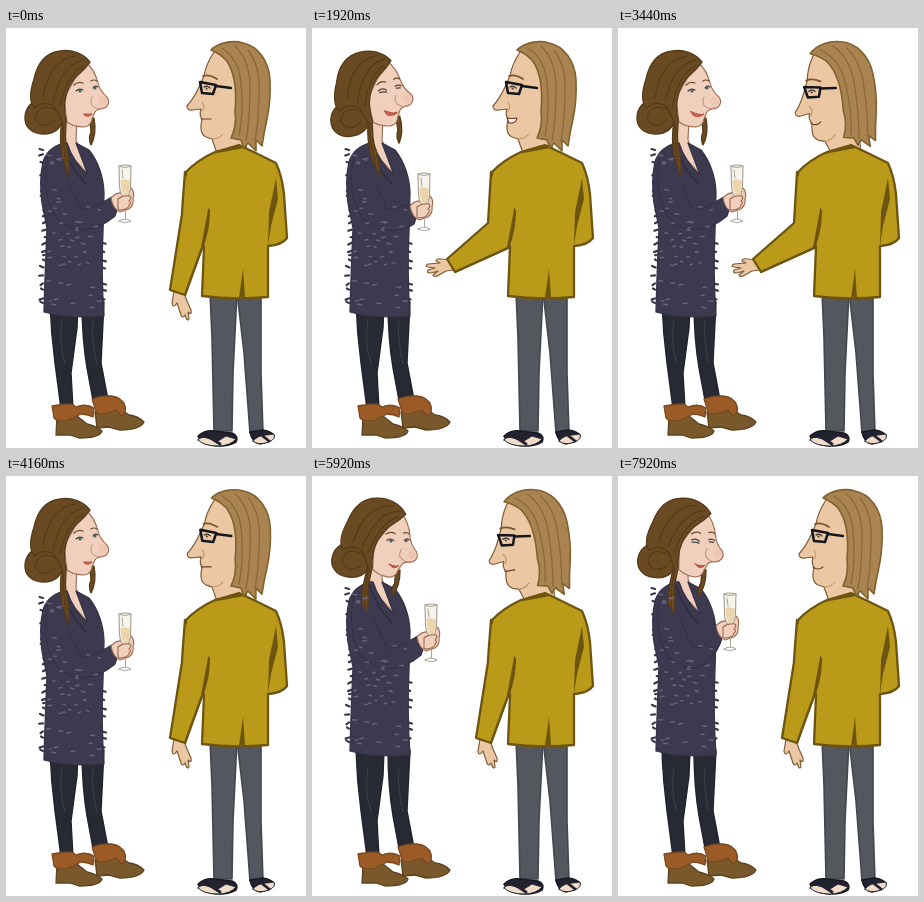
These frames come from a looping animation (300 by 420 pixels, 8000 ms). An HTML page:

```html
<!DOCTYPE html>
<html lang="en">
<head>
<meta charset="utf-8">
<title>Conversation</title>
<style>
html, body { margin: 0; width: 100%; height: 100%; overflow: hidden; background: #fff; }
svg { display: block; width: 100%; height: 100%; }
path { stroke-linejoin: round; stroke-linecap: round; }
.ln { fill: none; }
.legging { fill: #282a33; stroke: #20222c; stroke-width: 1.4; }
.boot { fill: #79592c; stroke: #5d421f; stroke-width: 1.3; }
.cuff { fill: #9a5b27; stroke: #79481e; stroke-width: 1.3; }
.coat { fill: #3d3a50; stroke: #343247; stroke-width: 1.3; }
.fold { fill: none; stroke: #2d2b3e; stroke-width: 1.2; }
.tuft { fill: none; stroke: #66647c; stroke-width: 1.5; }
.fringe { fill: none; stroke: #39374c; stroke-width: 2.2; }
.wskin { fill: #f0d0bd; stroke: #9c6a50; stroke-width: 1.1; }
.whair { fill: #694a22; stroke: #543a18; stroke-width: 1.3; }
.wlock { fill: none; stroke: #523817; stroke-width: 1; }
.trouser { fill: #54575e; stroke: #44474e; stroke-width: 1.6; }
.jacket { fill: #ba9a18; stroke: #6d5510; stroke-width: 2.3; }
.seam { fill: none; stroke: #6d5510; stroke-width: 2; }
.mskin { fill: #ebc8a3; stroke: #7d5c38; stroke-width: 1.2; }
.mhair { fill: #a98450; stroke: #80612f; stroke-width: 1.6; }
.mlock { fill: none; stroke: #8a6939; stroke-width: 1.3; }
.shoe { fill: #22232f; stroke: #181923; stroke-width: 1.5; }
.toe { fill: #f1dccb; stroke: #22232f; stroke-width: 1; }
</style>
</head>
<body>
<svg viewBox="0 0 300 420">
  <!-- woman -->
  <path class="legging" d="M44 274Q45 305 49 335L55 381H67L65 345 71 300 72 274Z"/>
  <path class="legging" d="M76 274Q76 310 81 340L87 372H102L95 335 98 274Z"/>
  <path class="ln" stroke="#3c3e49" d="M56 292Q52 312 59 336M87 292Q85 312 91 336"/>
  <path class="boot" d="M89 384L91 400 103 399 114 402Q134 402 138 394Q132 388 123 387L113 380Z"/>
  <path class="cuff" d="M86 371Q96 367 105 368Q116 369 119 378Q121 385 115 388L110 382Q100 386 91 386Z"/>
  <path class="boot" d="M51 388L50 407 64 407 73 410Q94 410 96 403Q90 398 81 396L71 388Z"/>
  <path class="cuff" d="M46 378Q56 376 66 376L70 379Q80 375 88 380L87 389Q81 386 75 386L63 392Q53 395 48 390Z"/>

  <g id="coat">
    <path id="fringe" class="fringe"/>
    <path class="wskin" d="M56 90H71L70 112 83 147 58 120Z"/>
    <path class="coat" d="M57 115Q41 120 37 134Q33 152 36 175L41 200Q39 245 38 284Q62 291 98 288Q95 245 97 203L98 165Q97 140 83 122L70 115 82 147Q67 134 61 115Z"/>
    <path class="fold" d="M58 119Q64 140 80 156"/>
  </g>

  <g id="wHead">
    <path class="whair" d="M84 92L88 90Q91 106 85 117Q82 110 85 104Z"/>
    <path class="wskin" d="M79 33Q89 42 92 55Q94 63 101 69C105 75 101 81 94 81Q89 82 88 86L86 91Q85 98 78 99Q68 99 61 94L58 70Z"/>
    <path class="ln" stroke="#c98c76" d="M86 69Q83 76 88 79Q92 82 97 80"/>
    <ellipse cx="97" cy="73" rx="4" ry="4.5" fill="#ecb9a5" opacity=".5"/>
    <path class="ln" stroke="#6e4a29" stroke-width="1.2" d="M68 57Q72 53 77 55M85 53Q88 51 91 53"/>
    <path id="wEye" class="ln" stroke="#4b413b" stroke-width="1.2"/>
    <g id="wIris" fill="#41606a"><circle cx="74" cy="63" r="1.6"/><circle cx="89" cy="60" r="1.5"/></g>
    <path id="wMouth" fill="#cb6554" stroke="#b9503f"/>
    <path class="whair" d="M41 72C29 69 20 78 19 88C18 99 26 106 37 106C48 106 57 100 57 89C57 80 51 74 41 72Z"/>
    <path class="whair" d="M84 34C77 25 65 21 54 23C39 25 31 37 28 51C24 63 23 75 29 80Q36 72 48 78L56 93Q53 109 56 128L63 149Q64 131 60 116C58 101 62 95 59 87C57 69 63 55 72 47Q79 41 84 34Z"/>
    <path class="wlock" d="M51 82Q32 74 29 90Q36 104 49 92M78 32Q56 35 47 73M70 28Q43 31 37 70M77 38Q60 47 54 78M57 95Q56 115 60 134"/>
  </g>

  <g id="arm">
    <path id="sleeve" class="coat"/>
    <path id="tufts" class="tuft"/>
    <g id="glass">
      <path class="wskin" d="M105 170Q110 164 117 165L125 160Q129 164 127 171Q128 177 123 181L114 184Q107 181 105 170Z"/>
      <path fill="#f7f4eb" stroke="#a39d94" stroke-width="1.1" d="M113 138Q119 136 125 138L124.5 158Q124 168 119.5 170Q114 168 113.5 158Z"/>
      <path fill="#ecd5ac" d="M114.5 152Q119 150 124 153Q124 166 119.5 169Q115 166 114.5 152Z"/>
      <path class="ln" stroke="#aaa59d" d="M113 138Q119 141 125 138M116 142L117 150M119.5 170V191M113 193Q119 189 125 193Q119 196 113 193Z"/>
      <path class="wskin" d="M112 171Q117 167 124 168Q126 170 123 173Q126 175 123 177Q123 182 112 182Z"/>
    </g>
  </g>

  <!-- man -->
  <path class="trouser" d="M204 264L206 310 208 403H226L227 345 231 264Z"/>
  <path class="trouser" d="M231 264L238 325 244 405H257L255 345 255 264Z"/>
  <path class="shoe" d="M192 408Q199 402 208 403L226 405Q233 408 230 414Q220 420 204 417Q194 414 192 408Z"/>
  <path class="toe" d="M192 412Q195 408 201 410L212 413 220 408 230 411Q224 418 212 418Q198 418 192 412Z"/>
  <path class="shoe" d="M244 404L256 402Q266 403 268 408Q265 414 254 416Q246 414 244 404Z"/>
  <path class="toe" d="M247 413Q252 407 260 407L268 406Q270 411 263 414Q252 418 247 413Z"/>
  <path class="ln" stroke="#22232f" stroke-width="2.8" d="M200 407L214 416M254 406L263 413"/>

  <g class="mHead">
    <path class="mskin" d="M208 24Q200 36 198 48L193 59Q188 70 181 78Q181 83 187 82L195 81Q193 87 196 91L195 97Q194 106 200 109L206 111 211 125 240 124 244 45 222 20Z"/>
    <path class="ln" stroke="#b98e65" d="M196 74Q200 80 196 83M206 111Q213 111 217 106"/>
    <path class="ln" stroke="#78572c" stroke-width="1.8" d="M197 48Q203 46 211 51"/>
    <path id="mEye" class="ln" stroke="#39302b" stroke-width="1.3"/>
    <path class="ln" stroke="#15161d" stroke-width="2.5" d="M194 54L196 65 207 66 210 57 194 54M210 58L225 60"/>
    <path id="mMouth" stroke="#70402d" stroke-width="1.2"/>
  </g>
  <path class="jacket" d="M209 124L233 117Q252 126 270 135Q276 148 278 166L281 210Q276 217 262 218L262 269Q228 272 196 268L198 219 179 145Q191 132 209 124Z"/>
  <path fill="#6d5510" d="M270 150L272 171 265 198 262 218 263 184ZM237 241L239 270 233 270ZM206 126Q222 120 234 117L238 120 222 123Z"/>
  <path id="handDown" class="mskin" d="M168 263L166 275Q167 281 171 275L174 284Q176 292 179 287Q181 294 183 291L182 284Q186 288 185 282L181 273 178 265Z"/>
  <path id="handOut" class="mskin" d="M138 232L130 231Q124 230 124 233L128 235 116 236Q112 238 116 239L123 240 116 242Q114 245 119 245L126 243 121 247Q122 250 127 247L134 243 141 242Z"/>
  <path id="mArm" class="jacket"/>
  <path fill="#ba9a18" d="M181 146L179 184 191 216 202 181 211 150Z"/>
  <path id="mSeam" class="seam"/>
  <g class="mHead">
    <path class="mhair" d="M205 22C213 14 227 12 237 15C252 18 263 33 264 52Q265 72 261 91Q258 104 256 118L250 112 250 123 242 115 238 120 235 112 225 110Q231 98 229 83C231 61 229 44 220 32Q213 25 205 22Z"/>
    <path class="mlock" d="M216 20Q233 31 235 55Q238 83 233 108M229 18Q244 33 244 59Q244 90 240 113M242 22Q254 38 253 61Q253 91 249 112"/>
  </g>
</svg>
<script>
const LOOP = 8000, STEP = 80;
const $ = id => document.getElementById(id);
const set = (id, d) => $(id).setAttribute("d", d);
const move = (el, v) => el.setAttribute("transform", v);
const show = (id, on) => $(id).style.display = on ? "" : "none";
const within = (t, a, b) => t >= a && t < b;
const mix = (a, b, u) => a + (b - a) * u;

// eased 0 to 1 between a and b
function ramp(t, a, b) {
  const u = Math.min(1, Math.max(0, (t - a) / (b - a)));
  return u * u * (3 - 2 * u);
}
// rises from a to b, falls from c to d
const pulse = (t, a, b, c, d) => ramp(t, a, b) - ramp(t, c, d);
// flapping mouth that stays open after the last syllable
const says = (t, from, last, end) => within(t, from, end) && (t >= last || t / STEP % 2 === 1);

const eyes = {
  open: "M70 63Q73 60 77 62M87 60Q89 57 92 59",
  narrow: "M69 63Q73 60 77 63M70 65Q74 64 77 65M86 60Q89 58 92 60M87 62L91 62",
  shut: "M68 64Q73 60 78 64M86 61Q89 57 92 61"
};

let seed = 17;
const rnd = () => (seed = seed * 16807 % 2147483647) / 2147483647;
const dash = (x, y, dx, dy) => `M${x} ${y}l${dx} ${dy}`;

// wool: pale flecks inside, dark spikes on the edges
function wool() {
  let flecks = "", spikes = "";
  for (let i = 0; i < 120; i++) {
    const x = 40 + rnd() * 53, y = 122 + rnd() * 160;
    const dense = y > 205 ? .65 : x < 53 ? .6 : y > 178 ? .5 : 0;
    if (rnd() < dense) flecks += dash(x, y, 2 + rnd() * 2, rnd() * 2 - 1);
  }
  for (let y = 122; y < 284; y += 3 + rnd() * 8) {
    const left = 37 + 3 * Math.sin((y - 165) / 25) * (y > 165 && y < 240);
    spikes += dash(left, y, -1 - rnd() * 3, rnd() * 4 - 2);
    if (y > 210 && rnd() < .5) spikes += dash(96, y, 2 + rnd() * 2, 1);
  }
  set("tufts", flecks);
  set("fringe", spikes);
}

function manArm(r) {
  const ox = mix(164, 135, r), oy = mix(262, 231, r);
  const ix = mix(179, 143, r), iy = mix(267, 244, r);
  set("mArm", `M179 144Q176 ${mix(182, 194, r)} 176 ${mix(186, 195, r)}L${ox} ${oy} ${ix} ${iy}L196 220 203 183Z`);
  set("mSeam", `M203 183Q203 202 196 220L${ix} ${iy}`);
  show("handDown", r <= .5);
  show("handOut", r > .5);
  move($("handDown"), `translate(${ox - 164} ${oy - 262}) rotate(${r * 70} 172 265)`);
  move($("handOut"), `translate(${ox - 135} ${oy - 231}) rotate(${(r - 1) * 70} 139 238)`);
}

function sleeve(x, y) {
  set("sleeve", `M42 128C36 154 41 184 55 194C69 205 89 205 ${109 + x} ${188 + y}Q${114 + x} ${179 + y} ${106 + x} ${169 + y}C95 175 85 182 75 181L62 153`);
}

function manFace(t) {
  const talking = says(t, 160, 240, 400) || says(t, 400, 1040, 1360) ||
    says(t, 1360, 1840, 2080) || says(t, 4080, 4960, 5440);
  const smile = within(t, 2080, 3680) || t >= 6400;
  set("mMouth", talking ? "M195 90Q200 91 205 90Q204 96 197 95Z"
    : `M195 91Q200 ${smile ? 95 : 91} 205 91`);
  $("mMouth").setAttribute("fill", talking ? "#fff3e9" : "none");
  set("mEye", t % 3760 === 800 ? "M198 61Q201 63 204 61" : "M198 59Q201 57 204 60M200 60L201 61");
}

function womanFace(t) {
  const shut = within(t, 2400, 3120) || t % 3200 === 480;
  const look = shut ? "shut" : within(t, 1440, 2400) || t >= 7280 ? "narrow" : "open";
  set("wEye", eyes[look]);
  show("wIris", look === "open");
  const wide = pulse(t, 1280, 1600, 3520, 3840) * 5;
  const glad = ramp(t, 5280, 5840) * 2;
  set("wMouth", `M${78 - wide - glad} ${86 - wide / 2}Q81 ${86 + wide / 3 + glad} 86 86Q82 ${90 + glad / 2} ${78 - wide / 2} ${87 + wide / 8}Z`);
}

function draw(t) {
  const man = 6 * pulse(t, 4000, 5040, 5280, 5600)
    - 9 * (pulse(t, 2160, 2640, 3440, 3680) + pulse(t, 5360, 5840, 6160, 6560));
  const woman = 10 * ramp(t, 5280, 5840) - 5 * pulse(t, 1280, 1760, 3040, 3360)
    - 4 * pulse(t, 7200, 7600, 7760, 7920) - ramp(t, 7200, 7600);
  const lift = `translate(0 ${-9 * ramp(t, 5280, 5840)})`;
  const low = pulse(t, 320, 720, 2160, 2560), high = ramp(t, 6160, 6560);
  const x = -7 * (low + high), y = 8 * low - 11 * high;

  document.querySelectorAll(".mHead").forEach(g => move(g, `rotate(${man} 222 106)`));
  move($("wHead"), `rotate(${woman} 65 92)`);
  move($("coat"), lift);
  move($("arm"), lift);
  move($("glass"), `translate(${x} ${y})`);
  sleeve(x, y);
  manArm(pulse(t, 1280, 1760, 3440, 3760));
  manFace(t);
  womanFace(t);
}

wool();
const start = performance.now();
function frame() {
  const t = (performance.now() - start) % LOOP;
  draw(Math.floor(t / STEP) * STEP);
  requestAnimationFrame(frame);
}
frame();
</script>
</body>
</html>
```
